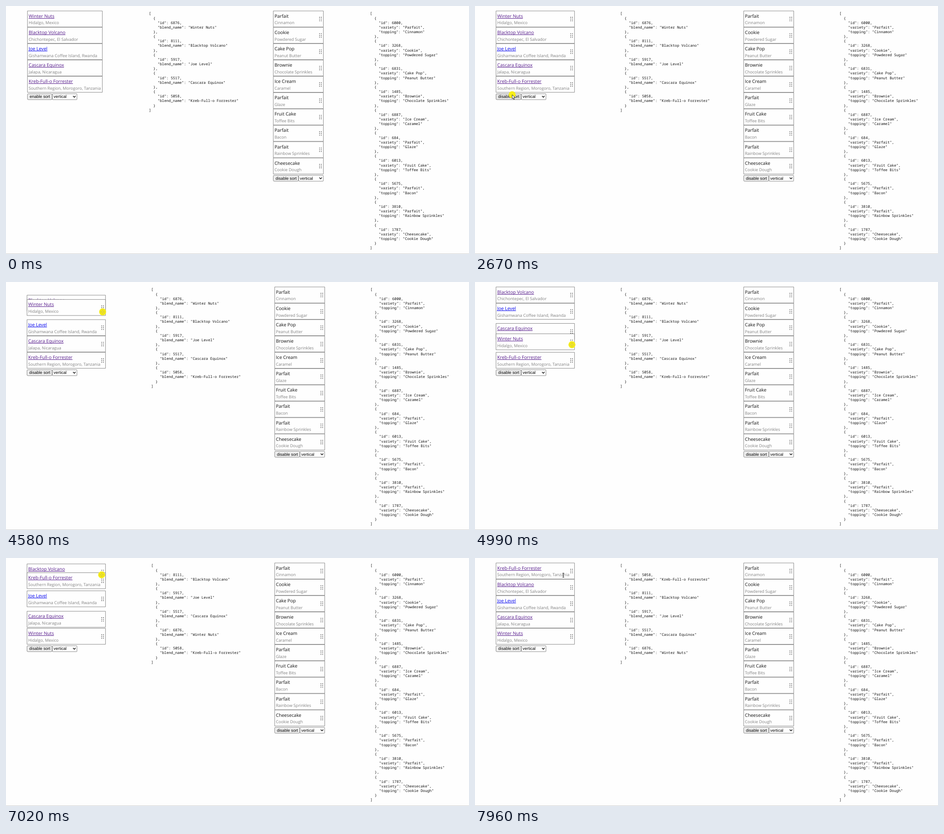
Recreate the animation shown at these times as an HTML page with a canvas. Size 1022x548 px, loop 8 s.

```html
<!DOCTYPE html>
<html lang="en">
<head>
<meta charset="utf-8">
<title>Sortable lists</title>
<style>
  html, body { margin: 0; width: 100%; height: 100%; overflow: hidden; background: #fefefe; }
  canvas { display: block; }
</style>
</head>
<body>
<canvas id="stage" width="1022" height="548"></canvas>
<script>
const ctx = document.getElementById('stage').getContext('2d');
const LOOP = 8000, TOP = 10.6, PITCH = 36.1, BORDER = .7, LAG = 30;
const PAPER = '#fefefe', INK = '#111';
const FONT = {
  title: '10.2px "Open Sans", sans-serif',
  sub: '9.1px "Open Sans", sans-serif',
  control: '9.1px "Liberation Sans", sans-serif',
  code: '8.05px "Noto Sans Mono", monospace'
};

const parse = list => list.trim().split('\n').map(line => line.trim().split(' | '));
const blends = parse(`
  6876 | Winter Nuts | Hidalgo, Mexico
  8111 | Blacktop Volcano | Chichontepec, El Salvador
  5917 | Joe Level | Gishamwana Coffee Island, Rwanda
  5517 | Cascara Equinox | Jalapa, Nicaragua
  5058 | Kreb-Full-o Forrester | Southern Region, Morogoro, Tanzania`);
const desserts = parse(`
  6000 | Parfait | Cinnamon
  3268 | Cookie | Powdered Sugar
  6831 | Cake Pop | Peanut Butter
  1485 | Brownie | Chocolate Sprinkles
  6887 | Ice Cream | Caramel
  684 | Parfait | Glaze
  6013 | Fruit Cake | Toffee Bits
  5675 | Parfait | Bacon
  3810 | Parfait | Rainbow Sprinkles
  1787 | Cheesecake | Cookie Dough`);

const between = (t, a, b) => t >= a && t < b;
const clamp = u => Math.min(1, Math.max(0, u));
const settle = u => 1 - (1 - u) ** 2.4;
const smooth = u => u * u * (3 - 2 * u);

// Neighbours make room one after another: the first at `first`, then every `step` ms.
const drags = [
  { start: 4300, drop: 5460, from: 0, to: 3, first: 4540, step: 187 },
  { start: 6750, drop: 7700, from: 4, to: 0, first: 6828, step: 63 }
];
const moves = [
  { start: 330, end: 1130, x: 151, y: 192, ease: settle },
  { start: 1220, end: 1940, x: 82, y: 196, ease: settle },
  { start: 3200, end: 3950, x: 213, y: 32.5, ease: settle },
  { start: 4300, end: 5060, x: 214, y: 141, ease: smooth },
  { start: 5990, end: 6700, x: 213, y: 173, ease: settle },
  { start: 6750, end: 7070, x: 211, y: 28, ease: smooth },
  { start: 7890, end: 7960, x: 195, y: 38, ease: settle }
];

function pointerAt(t) {
  let x = 896, y = 522;
  for (const move of moves) {
    const u = move.ease(clamp((t - move.start) / (move.end - move.start)));
    x += (move.x - x) * u;
    y += (move.y - y) * u;
  }
  return { x, y };
}

function text(str, x, y, font, color) {
  ctx.font = font;
  ctx.fillStyle = color;
  ctx.fillText(str, x, y);
}

function box(x, y, w, h, fill, stroke, radius = 0) {
  ctx.beginPath();
  ctx.roundRect(x + BORDER / 2, y + BORDER / 2, w - BORDER, h - BORDER, radius);
  ctx.fillStyle = fill;
  ctx.fill();
  ctx.lineWidth = BORDER;
  ctx.strokeStyle = stroke;
  ctx.stroke();
}

function drawHandle(cx, cy) {
  ctx.fillStyle = '#444';
  for (const dx of [-1.9, 1.9]) {
    for (const dy of [-3.8, 0, 3.8]) {
      ctx.beginPath();
      ctx.arc(cx + dx, cy + dy, .9, 0, 7);
      ctx.fill();
    }
  }
}

function drawRow([, title, sub], x, y, width, link, handle) {
  box(x, y, width, PITCH, PAPER, '#555');
  const left = x + 3;
  const color = !link ? INK : title === 'Joe Level' ? '#0000ee' : '#551a8b';
  text(title, left, y + 15.1, FONT.title, color);
  if (link) ctx.fillRect(left, Math.round(y + 16), ctx.measureText(title).width, 1);
  text(sub, left, y + 29.8, FONT.sub, '#808080');
  if (handle) drawHandle(x + width - 6.8, y + 18.2);
}

function drawControls(x, split, y, label, hover) {
  box(x, y, split - x, 13.7, hover ? '#e5e5e5' : '#efefef', '#555', 2);
  text(label, x + 5.3, y + 9.7, FONT.control, '#000');
  box(split, y, 55, 13.7, PAPER, '#555', 1);
  text('vertical', split + 3, y + 9.7, FONT.control, '#000');
  ctx.beginPath();
  ctx.moveTo(split + 46, y + 5.2);
  ctx.lineTo(split + 48.8, y + 8.2);
  ctx.lineTo(split + 51.6, y + 5.2);
  ctx.lineWidth = 1.4;
  ctx.strokeStyle = INK;
  ctx.stroke();
}

function drawJson(items, keys, x) {
  const objects = items.map(item => {
    const fields = keys.map((key, k) => `    "${key}": ${k ? `"${item[k]}"` : item[k]}`);
    return `  {\n${fields.join(',\n')}\n  }`;
  });
  `[\n${objects.join(',\n')}\n]`.split('\n').forEach((line, i) =>
    text(line, x, 19.4 + i * 10.157, FONT.code, INK));
}

function drawBlends(order, drag, t, x, width, sortable) {
  order.forEach((item, slot) => {
    let shift = 0;
    if (drag) {
      const direction = Math.sign(drag.to - drag.from);
      const rank = (slot - drag.from) * direction;
      if (rank === 0) return;
      const passed = rank > 0 && rank <= Math.abs(drag.to - drag.from);
      const begun = drag.first + (rank - 1) * drag.step;
      if (passed) shift = -direction * (1 - (1 - clamp((t - begun) / 200)) ** 3);
    }
    drawRow(item, x, TOP + (slot + shift) * PITCH, width, true, sortable);
  });
  if (!drag) return;
  const travel = pointerAt(t - LAG).y - pointerAt(drag.start).y;
  drawRow(order[drag.from], x, TOP + drag.from * PITCH + travel, width, true, true);
}

function polygon(points, x, y, fill, stroke) {
  ctx.beginPath();
  points.forEach(([px, py]) => ctx.lineTo(x + px, y + py));
  ctx.closePath();
  ctx.lineWidth = .9;
  ctx.lineJoin = 'round';
  ctx.fillStyle = fill;
  ctx.fill();
  ctx.strokeStyle = stroke;
  ctx.stroke();
}

const arrow = [[0, 0], [0, 9], [2, 7.2], [3.6, 10.8], [5, 10.2], [3.5, 6.8], [6.3, 6.6]];
const arm = [[-.7, -.7], [-.7, -4], [-2, -4], [0, -6], [2, -4], [.7, -4]];
const fourWay = [0, 1, 2, 3].flatMap(turn => arm.map(([x, y]) =>
  [[x, y], [-y, x], [-x, -y], [y, -x]][turn]));

function drawPointer(t) {
  if (t < 330) return;
  const { x, y } = pointerAt(t);
  const pressed = between(t, 2600, 2740) || drags.some(d => between(t, d.start, d.drop));
  if (pressed) {
    ctx.beginPath();
    ctx.arc(x, y, 7.7, 0, 7);
    ctx.fillStyle = '#f7ee18';
    ctx.fill();
  }
  if (t >= 7960) {
    ctx.fillStyle = '#222';
    ctx.fillRect(x - .5, y - 5, 1, 10);
    for (const end of [-5, 4]) ctx.fillRect(x - 2, y + end, 4, 1);
  } else if (between(t, 3950, 5990) || t >= 6700) {
    polygon(fourWay, x, y, pressed ? '#fff35a' : '#fff', pressed ? '#d8cc20' : '#333');
  } else {
    polygon(arrow, x, y, '#fff', '#222');
  }
}

function draw(t) {
  ctx.fillStyle = PAPER;
  ctx.fillRect(0, 0, 1022, 548);
  ctx.fillStyle = '#cfcfcf';
  ctx.fillRect(0, 547, 1022, 1);

  const sortable = t >= 2670;
  const order = [...blends];
  for (const d of drags) if (t >= d.drop) order.splice(d.to, 0, ...order.splice(d.from, 1));
  const drag = drags.find(d => between(t, d.start, d.drop));

  const left = sortable ? 46 : 47;
  drawBlends(order, drag, t, left, sortable ? 174 : 166, sortable);
  drawControls(left, 102, 193.6, sortable ? 'disable sort' : 'enable sort', between(t, 1560, 3240));
  drawJson(order, ['id', 'blend_name'], sortable ? 320.4 : 315.4);

  const right = sortable ? 592.7 : 589.7;
  desserts.forEach((item, i) => drawRow(item, right, TOP + i * PITCH, 111.2, false, true));
  drawControls(right, right + 56, 373.8, 'disable sort', false);
  drawJson(desserts, ['id', 'variety', 'topping'], sortable ? 804.2 : 803.4);

  drawPointer(t);
}

ctx.textRendering = 'geometricPrecision';
const began = performance.now();
function tick() {
  draw((performance.now() - began) % LOOP);
  requestAnimationFrame(tick);
}
tick();
</script>
</body>
</html>
```
